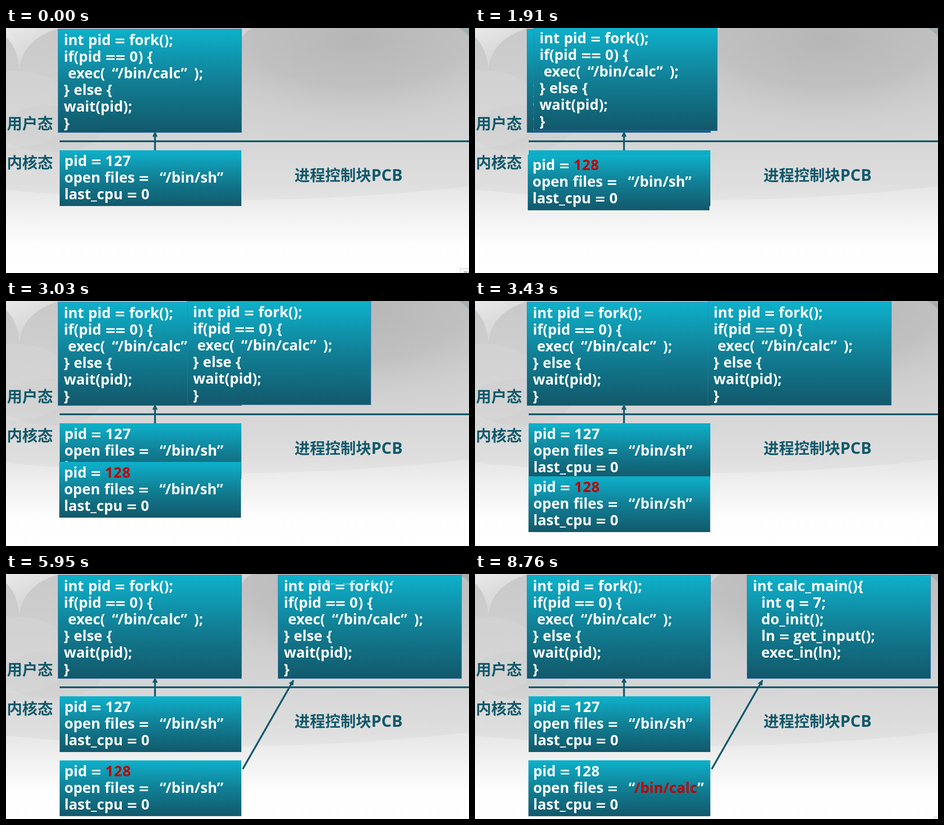
An HTML page for the animation above (8.96 s loop, 1027 by 545 pixels).

```html
<!DOCTYPE html>
<html lang="zh-CN">
<head>
<meta charset="utf-8">
<title>fork / exec</title>
<style>
  html, body { margin: 0; width: 100%; height: 100%; overflow: hidden; background: #fff; }
  #stage { position: relative; width: 1027px; height: 545px; overflow: hidden; }
  svg { position: absolute; left: 0; top: 0; }
  svg text { font: bold 34px "Open Sans", "Noto Sans CJK SC", "Noto Sans CJK", sans-serif; fill: #12596b; }
  svg .latin { font-size: 36px; }
  .card {
    position: absolute; box-sizing: border-box; margin: 0; color: #fff;
    background: linear-gradient(#0eb1cb, #117f95 50%, #12586a);
    font: bold 32px/36.9px "Open Sans", "Noto Sans", sans-serif;
    white-space: pre; word-spacing: 1px;
  }
  .user { left: 115px; top: 2px; width: 408px; height: 231px; padding: 6px 0 0 13.3px; box-shadow: inset 0 0 0 1px #3c76b8; }
  .kernel { left: 119px; top: 272px; width: 403px; height: 124px; padding: 5px 0 0 10.5px; }
  .card span { line-height: 0; }
  .eq { font-family: "DejaVu Sans", sans-serif; font-size: 30px; margin: 0 -1.6px; }
  .num { letter-spacing: .8px; }
  .open { margin: 0 -1.5px 0 15px; }
  .close { margin-right: 15px; }
  .card em { font-style: normal; color: #c00000; }
  #corner {
    position: absolute; left: 0; top: 0; width: 40px; height: 30px; box-sizing: border-box; overflow: hidden;
    background: #fff; border: 1px solid #bbb; color: #888;
    font: 12px/14px "Noto Sans CJK SC", "Noto Sans CJK", sans-serif; padding: 3px 0 0 5px;
  }
</style>
</head>
<body>
<div id="stage">
  <svg width="1027" height="545">
    <defs>
      <linearGradient id="base" x2="0" y2="1">
        <stop offset="0" stop-color="#d0d0d0"/>
        <stop offset=".45" stop-color="#dcdcdc"/>
        <stop offset=".65" stop-color="#e6e6e6"/>
        <stop offset=".8" stop-color="#f5f5f5"/>
        <stop offset=".88" stop-color="#fdfdfd"/>
        <stop offset="1" stop-color="#fff"/>
      </linearGradient>
      <radialGradient id="shade" gradientUnits="userSpaceOnUse" cx="0" cy="0" r="1" gradientTransform="translate(780 20) scale(520 250)">
        <stop offset="0" stop-color="#b6b6b6"/>
        <stop offset=".45" stop-color="#bdbdbd" stop-opacity=".8"/>
        <stop offset="1" stop-color="#d6d6d6" stop-opacity="0"/>
      </radialGradient>
      <linearGradient id="leaf" x2=".6" y2="1">
        <stop offset="0" stop-color="#fff" stop-opacity=".6"/>
        <stop offset="1" stop-color="#fff" stop-opacity=".05"/>
      </linearGradient>
      <marker id="head" viewBox="0 0 10 10" refX="9" refY="5" markerWidth="12" markerHeight="12" markerUnits="userSpaceOnUse" orient="auto">
        <path d="M0 0L10 5L0 10Z" fill="#12596b"/>
      </marker>
    </defs>
    <rect width="1027" height="545" fill="url(#base)"/>
    <ellipse cx="480" cy="130" rx="1140" ry="253" fill="#000" opacity=".03"/>
    <path d="M0 0H118Q34 26 30 94Q26 44 0 20Z" fill="url(#leaf)"/>
    <ellipse cx="100" cy="225" rx="112" ry="52" fill="#000" opacity=".02"/>
    <ellipse cx="20" cy="180" rx="130" ry="85" fill="#fff" opacity=".07"/>
    <rect x="400" width="627" height="280" fill="url(#shade)"/>
    <path d="M523 0H545Q531 9 523 21Z" fill="#d6d6d6" opacity=".8"/>
    <path d="M1004 0H1027V19Q1018 8 1004 0Z" fill="#a5afb2"/>
    <g stroke="#12596b" stroke-width="4">
      <path d="M119 252H1027"/>
      <path d="M330.500 272V231" marker-end="url(#head)"/>
    </g>
    <text x="2" y="225">用户态</text>
    <text x="2" y="312">内核态</text>
    <text x="640" y="340">进程控制块<tspan class="latin">PCB</tspan></text>
  </svg>
  <svg id="arrow" width="1027" height="545">
    <path d="M525 434L637.500 236.500" stroke="#12596b" stroke-width="4" marker-end="url(#head)"/>
  </svg>
  <div id="corner">录制</div>
</div>
<script>
const LOOP = 8960, FIRST = 1400, TICK = 101.1;
const stage = document.getElementById('stage');
const arrow = document.getElementById('arrow');
const corner = document.getElementById('corner');

const forkCode = 'int pid = fork();\nif(pid == 0) {\n exec(“/bin/calc”);\n} else {\nwait(pid);\n}';
const calcCode = 'int calc_main(){\n  int q = 7;\n  do_init();\n  ln = get_input();\n  exec_in(ln);';
const pcb = (pid, file) => `pid = ${pid}\nopen files = “${file}”\nlast_cpu = 0`;

// Text between asterisks is shown in red.
function markup(text) {
  const kind = { '=': 'eq', '“': 'open', '”': 'close' };
  return text
    .replace(/[=“”]|\d+/g, s => `<span class="${kind[s] || 'num'}">${s}</span>`)
    .replace(/\*(.+?)\*/g, '<em>$1</em>');
}

function card(type, text) {
  const el = document.createElement('div');
  el.className = 'card ' + type;
  el.innerHTML = markup(text);
  stage.insertBefore(el, arrow);
  return el;
}

card('user', forkCode);
card('kernel', pcb('127', '/bin/sh'));
const childUser = card('user', forkCode);
const childKernel = card('kernel', pcb('*128*', '/bin/sh'));
const calcUser = card('user', calcCode);
const calcKernel = card('kernel', pcb('128', '*/bin/calc*'));

const clamp = v => Math.min(1, Math.max(0, v));
const mix = (a, b, f) => a + (b - a) * f;
const show = (el, on) => { el.style.visibility = on ? 'visible' : 'hidden'; };
const move = (el, x, y) => { el.style.transform = `translate(${x}px,${y}px)`; };

// Constant acceleration, constant speed, constant deceleration.
function ease(u) {
  const a = 0.42;
  if (u < a) return u * u / (2 * a * (1 - a));
  if (u > 1 - a) return 1 - (1 - u) ** 2 / (2 * a * (1 - a));
  return (u - a / 2) / (1 - a);
}

function wipe(el, side, height, p) {
  const soft = 20, edge = p * (height + soft);
  const mask = p < 1 ? `linear-gradient(to ${side},#000 ${edge - soft}px,transparent ${edge}px)` : 'none';
  el.style.webkitMaskImage = el.style.maskImage = mask;
  show(el, p > 0);
}

move(calcUser, 488, 0);
move(calcKernel, -0.5, 142.6);

function render(time) {
  const t = FIRST + TICK * Math.floor((time - FIRST) / TICK);
  const f = ease(clamp((t - 1567) / 2630));

  show(childUser, time >= FIRST);
  show(childKernel, time >= FIRST);
  move(childUser, mix(-2, 488, f), mix(-4.2, 0, f));
  move(childKernel, mix(-2, 0, f), mix(4.8, 142.6, f));

  const drawn = clamp((t - 4400) / 530);
  show(arrow, drawn > 0);
  arrow.style.clipPath = `inset(${mix(436, 230, drawn)}px 0 0 0)`;

  const swap = clamp((t - 5849) / 1010);
  wipe(calcUser, 'bottom', 230, swap);
  wipe(calcKernel, 'top', 124, swap);

  show(corner, time < 100 || time >= 8660);
  const [x, y] = time < 100 ? [1007, 535] : time < 8760 ? [1023, 543] : [1018, 540];
  move(corner, x, y);
}

const start = performance.now();
function frame() {
  render((performance.now() - start) % LOOP);
  requestAnimationFrame(frame);
}
frame();
</script>
</body>
</html>
```
